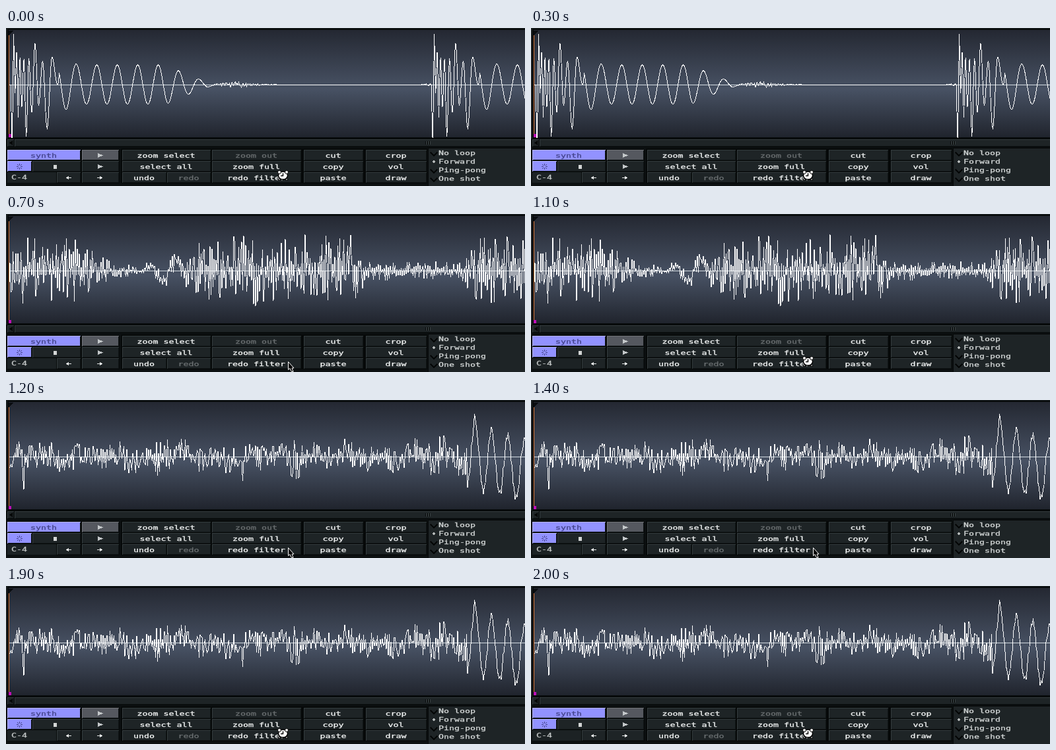
An HTML page that plays this animation: 786 by 240 pixels, repeating every 2200 ms.

```html
<!DOCTYPE html>
<html lang="en">
<head>
<meta charset="utf-8">
<title>Sample editor</title>
<style>
html, body { margin: 0; width: 100%; height: 100%; overflow: hidden; background: #1c2224; }
svg { display: block; width: 786px; height: 240px; shape-rendering: crispEdges; }
text { font: 9.5px "DejaVu Sans Mono", monospace; stroke-width: .3px; }
.smooth { shape-rendering: geometricPrecision; }
</style>
</head>
<body>
<svg id="stage" viewBox="0 0 786 240" xmlns="http://www.w3.org/2000/svg"></svg>
<script>
const LOOP = 2200, MID = 86, LEFT = 4, WIDTH = 786;
const ROW = 185, PITCH = 17, KEY = 16;
const stage = document.getElementById('stage');

// ---------- drawing helpers ----------
const rect = (x, y, w, h, fill) =>
  `<rect x="${x}" y="${y}" width="${w}" height="${h}" fill="${fill}"/>`;
const path = (d, fill, extra = '') => `<path d="${d}" fill="${fill}" ${extra}/>`;
const line = (d, color, width = 1) =>
  path(d, 'none', `stroke="${color}" stroke-width="${width}"`);

// The whole interface uses one wide, low typeface.
const label = (str, x, y, fill = '#f0f2f2', anchor = 'middle') =>
  `<text transform="translate(${x} ${y}) scale(1.4 1)" text-anchor="${anchor}" fill="${fill}" stroke="${fill}">${str}</text>`;

const rowY = row => ROW + row * PITCH;

function button(x, y, w, h = KEY, face = '#1e2426', light = '#343c3e') {
  return rect(x - 1, y - 1, w + 2, h + 2, '#060909') + rect(x, y, w, h, light) +
    rect(x + 1, y + 1, w - 1, h - 1, '#101516') + rect(x + 1, y + 1, w - 2, h - 2, face);
}
const textButton = (str, x, row, w, fill) =>
  button(x, rowY(row), w) + label(str, x + w / 2 - .5, rowY(row) + 12, fill);
const play = (x, y) => path(`M${x} ${y}l8 3.5l-8 3.5z`, '#c4c8ca');
const arrow = (x, y, dir) =>
  line(`M${x - 4 * dir} ${y}h${8 * dir}`, '#e4e6e6') +
  path(`M${x + 4 * dir} ${y}l${-4 * dir} -3v6z`, '#e4e6e6');

// ---------- waveforms ----------
function random(seed) {
  return () => {
    seed = (Math.imul(seed, 1664525) + 1013904223) >>> 0;
    return seed / 4294967296;
  };
}

const bump = (x, center, width) => Math.exp(-(((x - center) / width) ** 2));
const wave = (x, peak, period) => Math.cos(2 * Math.PI * (x - peak) / period);

// Piecewise envelope through [x, value] pairs.
function envelope(points, x) {
  const i = Math.max(1, points.findIndex(p => p[0] >= x));
  const [x0, y0] = points[i - 1], [x1, y1] = points[i];
  return y0 + (y1 - y0) * (x - x0) / (x1 - x0);
}

function trace(height, step) {
  const pts = [];
  for (let x = LEFT; x <= WIDTH; x += step) pts.push(`${x + .5} ${(MID - height(x)).toFixed(1)}`);
  return 'M' + pts.join('L');
}

// A drum hit: a falling chirp that settles into a steady, fading tone.
function drumHit(x) {
  const swings = [80, 78, 17, 58, 50, 46, 38, 42, 80, 40, 44, 64, 32, 36, 67, 42, 0];
  const turn = k => 9 + 2.1 * k + .0085 * k ** 3;
  if (x < 8) return 0;
  if (x > 79) {
    const fade = Math.min(1, Math.max(0, (322 - x) / 80));
    return (30 + 8 * bump(x, 90, 12)) * fade ** 1.3 * wave(x, 137, 31);
  }
  let k = 0;
  while (k < 15 && turn(k + 1) <= x) k++;
  const side = k % 2 ? 1 : -1, from = side * swings[k], to = -side * swings[k + 1];
  const part = Math.max(0, (x - turn(k)) / (turn(k + 1) - turn(k)));
  return from + (to - from) * (1 - Math.cos(Math.PI * part)) / 2;
}

function drumWave() {
  const rnd = random(5), again = 637;
  return trace(x => {
    const hiss = 4.5 * bump(x, 350, 28) + 2 * bump(x, 639, 5);
    return drumHit(x > again ? x - again : x) + (rnd() * 2 - 1) * hiss;
  }, 1);
}

function noise(seed, swing, power) {
  const rnd = random(seed);
  let sign = 1;
  return () => {
    if (rnd() < swing) sign = -sign;
    return sign * (.1 + .9 * rnd() ** power);
  };
}

function brightWave() {
  const next = noise(71, .86, 1.6);
  const loud = [[4, 52], [95, 54], [165, 12], [205, 8], [270, 22], [305, 54], [520, 56],
    [545, 26], [580, 14], [690, 15], [710, 52], [786, 54]];
  return trace(x => envelope(loud, x) * next() + 17 * bump(x, 245, 32) * wave(x, 216, 41), 1.5);
}

function roughWave() {
  const next = noise(29, .66, 1.3);
  return trace(x => {
    const drift = 5 * Math.sin(x / 8) + 3 * Math.sin(x / 19);
    const dips = 20 * bump(x, 10, 4) + 45 * bump(x, 26, 2) + 26 * bump(x, 356, 5);
    const loud = 20 + 22 * bump(x, 236, 9) + 14 * bump(x, 438, 12) + 10 * bump(x, 665, 30);
    if (x < 698) return drift - dips + loud * next();
    return (45 + 15 * bump(x, 710, 6)) * wave(x, 710, 24.8) - .3 * (x - 710) + 8 * next();
  }, 1.5);
}

const waves = [drumWave(), brightWave(), roughWave()];

// ---------- interface ----------
function editor() {
  return `<defs><linearGradient id="back" x2="0" y2="1">
      <stop offset="0" stop-color="#242832"/><stop offset=".55" stop-color="#485264"/>
      <stop offset="1" stop-color="#20242d"/></linearGradient></defs>` +
    rect(0, 0, WIDTH, 240, '#1c2224') + rect(2, 1, 784, 167, '#070a0b') +
    rect(LEFT, 3, 782, 163, 'url(#back)') +
    line(`M${LEFT} ${MID + .5}H${WIDTH}`, '#d4dce2') +
    '<path id="wave" fill="none" stroke="#fff" stroke-width="1"/>' +
    rect(LEFT, 8, 1, 157, '#d9793c') + path('M4 4h7l-7 7z', '#0a0d10') +
    rect(LEFT, 161, 4, 5, '#c010b8');
}

function scrollbar() {
  let out = button(2, 169, 10, 11) + path('M5 174.5l5 -4v8z', '#050707') +
    button(13, 169, 780, 11);
  for (let x = 635; x < 643; x += 3) out += rect(x, 172, 1, 5, '#050707') + rect(x + 1, 172, 1, 5, '#3c4446');
  return out;
}

function transport() {
  const lilac = '#9292ff', glow = '#b2b2ff', ink = '#45458c';
  const [top, middle, bottom] = [0, 1, 2].map(rowY);
  return button(2, top, 111, KEY, lilac, glow) + label('synth', 57, top + 12, ink) +
    button(115, top, 56, KEY, '#55585f', '#707379') + play(139, top + 5) +
    button(2, middle, 37, KEY, lilac, glow) +
    line('M16 210.5h9M20.5 206v9M17 207l7 7M24 207l-7 7', ink) + rect(19, 209, 3, 3, lilac) +
    button(40, middle, 73) + rect(72, 208, 5, 6, '#d4d6d6') +
    button(115, middle, 56) + play(139, middle + 5) +
    rect(2, bottom, 74, KEY, '#1c2224') + label('C-4', 8, bottom + 11, '#c2c6c6', 'start') +
    button(77, bottom, 36) + arrow(95, bottom + 8.5, -1) +
    button(115, bottom, 56) + arrow(142, bottom + 8.5, 1);
}

function commands() {
  const dim = '#686d6f';
  const column = (x, w, names) => names.map((name, row) =>
    textButton(name, x, row, w, name === 'zoom out' ? dim : undefined)).join('');
  return rect(174, 183, 464, 53, '#060909') +
    column(176, 134, ['zoom select', 'select all']) +
    textButton('undo', 176, 2, 67) + textButton('redo', 244, 2, 66, dim) +
    column(312, 135, ['zoom out', 'zoom full', 'redo filter']) +
    column(451, 90, ['cut', 'copy', 'paste']) +
    column(545, 92, ['crop', 'vol', 'draw']);
}

function loopModes() {
  return rect(639, 182, 147, 58, '#060909') + rect(640, 183, 146, 57, '#1e2426') +
    ['No loop', 'Forward', 'Ping-pong', 'One shot'].map((name, i) => {
      const y = 193 + 13 * i;
      const mark = i === 1 ? path(`M647.5 ${y - 5.5}l2.5 2.5l-2.5 2.5l-2.5 -2.5z`, '#b4b8b8')
        : line(`M643 ${y - 4}l5 5l5 -5`, '#050707', 1.5);
      return mark + label(name, 655, y, '#d0d4d4', 'start');
    }).join('');
}

const cursors = `
  <path id="pointer" class="smooth" d="M427.5 224.5v12l2.5 -2l2.5 5h2.5l-2 -5.5h3z"
    fill="#000" stroke="#fff"/>
  <g id="busy" class="smooth" fill="#fff" stroke="#000">
    <path d="M414 228l-2 3h4zM425 228l2 3h-4z"/>
    <ellipse cx="419.5" cy="224" rx="7" ry="6" stroke-width="1.5"/>
    <circle cx="414" cy="219" r="2.5"/><circle cx="425" cy="219" r="2.5"/>
    <path d="M419.5 220.5v4h-3.5" fill="none" stroke-width="1.4"/>
  </g>`;

stage.innerHTML = editor() + rect(0, 168, WIDTH, 72, '#0c1011') +
  scrollbar() + transport() + commands() + loopModes() + cursors;

const [curve, pointer, busy] = ['wave', 'pointer', 'busy'].map(id => document.getElementById(id));
const FIRST = 400, PASS = 800, REST = 400;
let shown = -1;

// Each pass of the filter: busy cursor, new waveform, then the pointer for a moment.
function draw(time) {
  const t = time % LOOP;
  const pass = Math.min(2, Math.floor((t - FIRST) / PASS) + 1);
  const since = t - FIRST - (pass - 1) * PASS;
  const idle = pass > 0 && since < REST;
  if (pass !== shown) curve.setAttribute('d', waves[shown = pass]);
  pointer.setAttribute('visibility', idle ? 'visible' : 'hidden');
  busy.setAttribute('visibility', idle ? 'hidden' : 'visible');
}

function tick() {
  draw(performance.now());
  requestAnimationFrame(tick);
}
tick();
</script>
</body>
</html>
```
